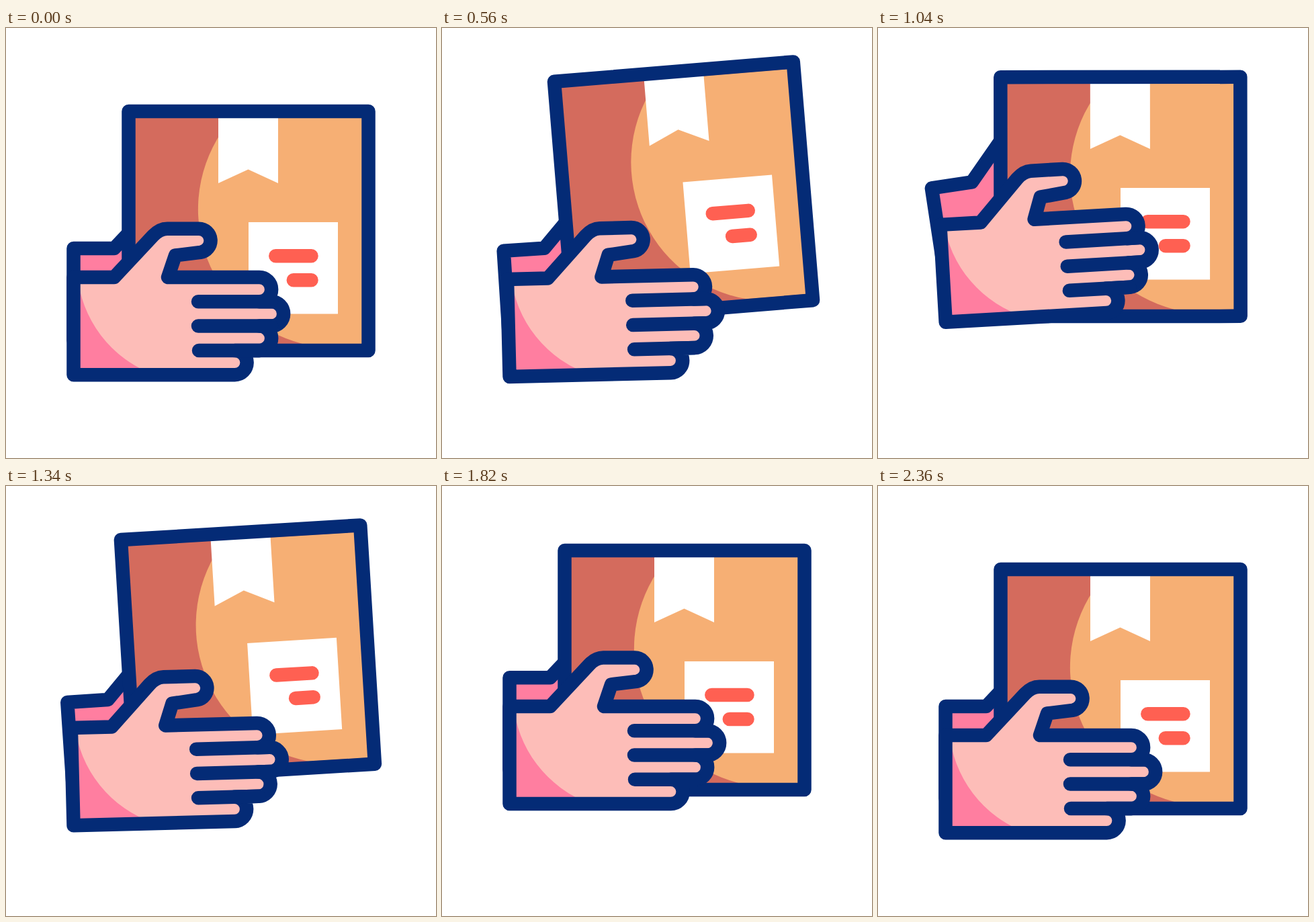
An HTML page that plays this animation: 640 by 640 pixels, repeating every 2400 ms.

```html
<!DOCTYPE html>
<html lang="en">
<head>
<meta charset="utf-8">
<title>Package handover</title>
<style>
  html, body { margin: 0; height: 100%; overflow: hidden; background: #fff; }
  svg { display: block; width: 100vw; height: 100vh; }
  .line { fill: none; stroke: #042b76; stroke-width: 20.5; stroke-linecap: round; stroke-linejoin: round; }
  .text { stroke: #ff6052; }
</style>
</head>
<body>
<svg viewBox="0 0 640 640">
  <defs>
    <path id="palm" d="M100.5 516.2V371H161L219 309Q229 298.7 240 298.7H287a17.7 17.7 0 0 1 2.5 35.2L252 338.5L241 371H377a18.15 18.15 0 0 1 0 36.3H395a18.15 18.15 0 0 1 0 36.3H377a18.15 18.15 0 0 1 0 36.3H340.5a18.15 18.15 0 0 1 0 36.3Z"/>
  </defs>
  <g id="arm">
    <path fill="#ff7ea0" d="M100 328H161L235 250V465H100Z"/>
    <path class="line" d="M100.5 465V328H161L235 250"/>
  </g>
  <g id="box">
    <path fill="#d46b5d" d="M182.5 124H539.5V480H182.5Z"/>
    <path fill="#f6af74" d="M337 134A206.5 206.5 0 0 0 441 470H530V134Z"/>
    <path fill="#fff" d="M316 124V231L360.5 210.5L405 231V124ZM361 289H494V425.5H361Z"/>
    <path class="line text" d="M401.3 339.2H454.5M427.8 375.2H454.5"/>
    <path class="line" d="M182.5 124H539.5V480H182.5Z"/>
  </g>
  <g id="hand">
    <use href="#palm" fill="#fdbdb8"/>
    <path fill="#ff7ea0" d="M100 365H106A175 175 0 0 0 221 516H100Z"/>
    <use href="#palm" class="line"/>
    <path class="line" d="M286 407.3H395M286 443.6H395M287 479.9H377"/>
  </g>
</svg>
<script>
  const LOOP = 2400;

  // Two tosses and a small settling bounce: [time, height].
  const bounce = [[0, 0], [288, -91], [620, 45], [1020, -91], [1420, 20], [1768, -43.5], [2190, 0]];

  // All parts follow the same bounce, each a little later than the one before.
  const wrist = { start: 80, peak: 310, end: 740, every: 785 };
  const parts = [
    { id: 'arm', pivot: '100 465', delay: 20, dip: 0.4, tilt: -9.95, swing: wrist },
    { id: 'hand', pivot: '230 516', delay: 71, dip: 1, tilt: -3.8, swing: wrist },
    { id: 'box', pivot: '361 320', delay: 167, dip: 1, tilt: -5,
      swing: { start: 290, peak: 530, end: 735, every: 735 } }
  ];
  for (const part of parts) part.node = document.getElementById(part.id);

  // Sine ease from 0 to 1 between two times.
  function ease(t, from, to) {
    const u = Math.min(1, Math.max(0, (t - from) / (to - from)));
    return (1 - Math.cos(Math.PI * u)) / 2;
  }

  function height(t, dip) {
    let y = 0;
    for (let i = 1; i < bounce.length; i++) {
      const [from, a] = bounce[i - 1], [to, b] = bounce[i];
      const scale = v => v > 0 ? v * dip : v;
      y += (scale(b) - scale(a)) * ease(t, from, to);
    }
    return y;
  }

  // One tilt and return per toss.
  function lean(t, { start, peak, end, every }) {
    const once = s => ease(s, start, peak) - ease(s, peak, end);
    return once(t) + once(t - every);
  }

  function tick() {
    const t = performance.now() % LOOP;
    for (const { node, pivot, delay, dip, tilt, swing } of parts) {
      node.setAttribute('transform',
        `translate(0 ${height(t - delay, dip)}) rotate(${tilt * lean(t, swing)} ${pivot})`);
    }
    requestAnimationFrame(tick);
  }
  tick();
</script>
</body>
</html>
```
